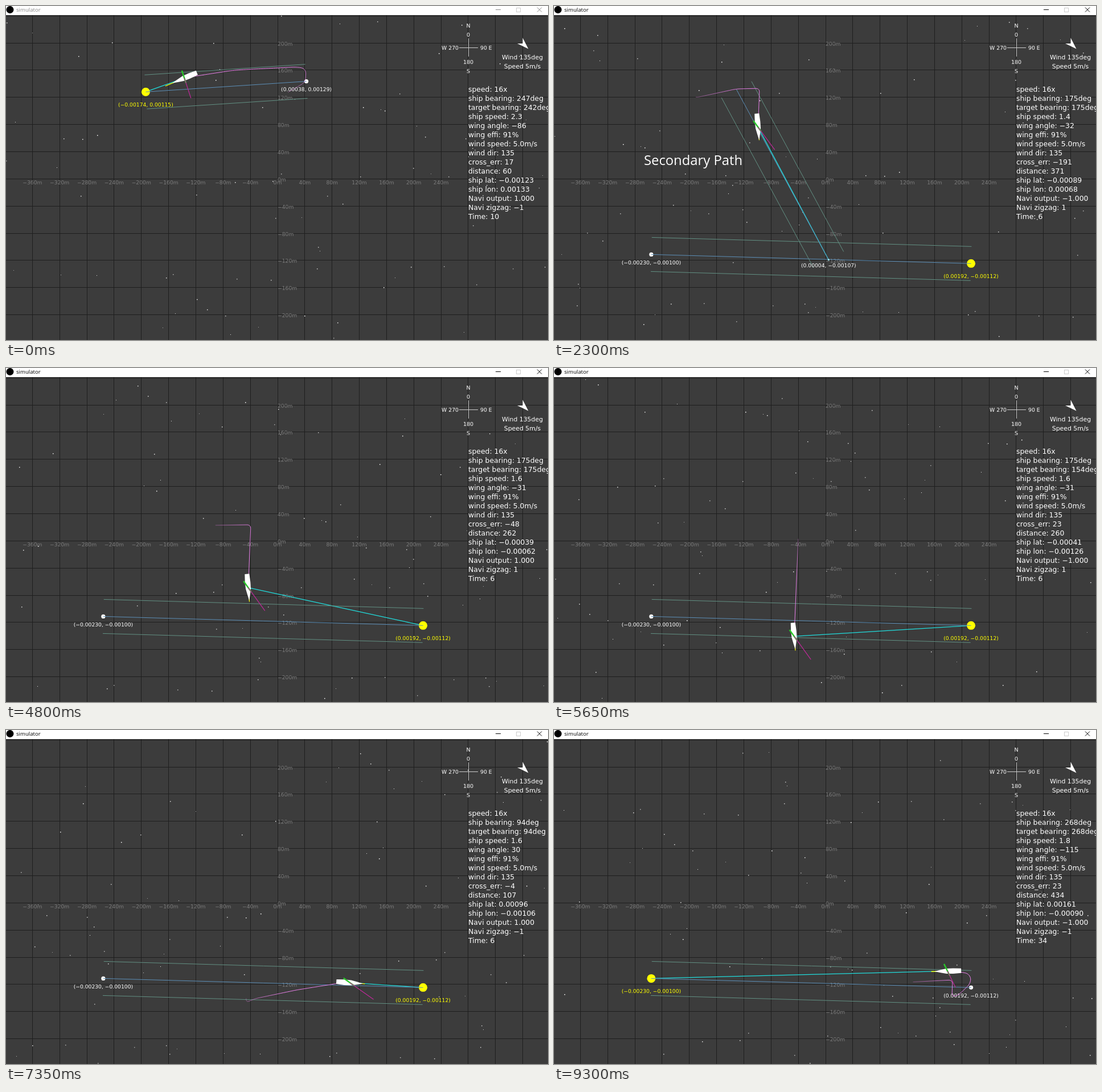
Write an HTML page with a canvas that moves like this. It is 952x588 px and loops after 9.35 s.

```html
<!DOCTYPE html>
<html lang="en">
<head>
<meta charset="utf-8">
<title>simulator</title>
<style>
  html, body { margin: 0; width: 100%; height: 100%; overflow: hidden; background: #3c3c3c; }
  canvas { display: block; }
</style>
</head>
<body>
<canvas id="stage" width="952" height="588"></canvas>
<script>
const ctx = document.getElementById('stage').getContext('2d');
const LOOP = 9350, STEP = 50, TRAIL = 1700, TURN = 70;
const ORIGIN_X = 477, ORIGIN_Y = 304.3, PX_PER_DEG = 133100;
const GRID = 47.85, PX_PER_M = PX_PER_DEG / 111000;
const SANS = '"DejaVu Sans", sans-serif';
const UI = '"Open Sans", sans-serif';

// Where the ship changes course: time, x, y
const turns = [
  [-1750, 490, 155], [-1400, 526, 134], [-1220, 527, 111], [-1130, 515, 107],
  [-600, 400, 113], [15, 311, 126.8], [520, 242, 156], [580, 246, 162],
  [1170, 320, 146], [1565, 361, 145], [2985, 356, 277], [3705, 430, 276],
  [5725, 421.5, 480], [5890, 437, 473], [6500, 510.3, 457.7], [7150, 583, 446],
  [8255, 700, 440], [8560, 699, 470], [8640, 709, 468], [8860, 733, 445],
  [8960, 731, 430], [9040, 721, 427], [9450, 674, 423]
];

const place = (lat, lon) => ({ lat, lon, x: ORIGIN_X + lat * PX_PER_DEG, y: ORIGIN_Y - lon * PX_PER_DEG });
const east = place(0.00038, 0.00129), west = place(-0.00174, 0.00115);
const left = place(-0.0023, -0.001), right = place(0.00192, -0.00112);
const detourStart = { x: 320.5, y: 147 }, detourEnd = place(0.00004, -0.00107);
const legs = [
  { begin: 0, from: east, to: west, timer: 10 },
  { begin: 500, from: west, to: east, timer: 6 },
  { begin: 1150, from: left, to: right, timer: 6 },
  { begin: 8650, from: right, to: left, timer: 34 }
];

const sin = deg => Math.sin(deg * Math.PI / 180);
const bearingVector = deg => [sin(deg), -sin(90 - deg)];
const bearingOf = (x, y) => (Math.atan2(y, x) * 180 / Math.PI + 450) % 360;
const number = (value, digits = 0) => value.toFixed(digits).replace('-', '\u2212');

function routePoint(t) {
  const i = Math.max(1, turns.findIndex(p => p[0] > t));
  const a = turns[i - 1], b = turns[i], u = (t - a[0]) / (b[0] - a[0]);
  return [a[1] + (b[1] - a[1]) * u, a[2] + (b[2] - a[2]) * u];
}

// Averaging the straight route over a short time rounds its corners
function position(t) {
  let x = 0, y = 0;
  for (let k = -4; k <= 4; k++) {
    const p = routePoint(t + k / 4.5 * TURN);
    x += p[0] / 9;
    y += p[1] / 9;
  }
  return [x, y];
}

function shipAt(t) {
  const [x, y] = position(t), before = routePoint(t - TURN), after = routePoint(t + TURN);
  const dx = after[0] - before[0], dy = after[1] - before[1];
  const course = bearingOf(dx, dy);
  const heading = (course + 10 * sin(135 - course) + 360) % 360; // leeway
  const speed = Math.hypot(dx, dy) / (2 * TURN) * 15.5;
  const [hx, hy] = bearingVector(heading), [wx, wy] = bearingVector(135);
  const ax = wx * 5 + hx * speed, ay = wy * 5 + hy * speed;
  const wind = bearingOf(ax, ay);
  const wing = (wind - heading + 540) % 360 - 180;
  return { x, y, heading, speed, wind, wing, windSpeed: Math.hypot(ax, ay) };
}

function line(x1, y1, x2, y2, color, width = 1) {
  ctx.strokeStyle = color;
  ctx.lineWidth = width;
  ctx.beginPath();
  ctx.moveTo(x1, y1);
  ctx.lineTo(x2, y2);
  ctx.stroke();
}

function dot(x, y, r, color) {
  ctx.fillStyle = color;
  ctx.beginPath();
  ctx.arc(x, y, r, 0, 7);
  ctx.fill();
}

function shape(points, fill) {
  ctx.fillStyle = fill;
  ctx.beginPath();
  points.forEach(p => ctx.lineTo(...p));
  ctx.closePath();
  ctx.fill();
}

function text(string, x, y, size, color = '#fff', align = 'left', family = SANS) {
  ctx.font = `${size}px ${family}`;
  ctx.fillStyle = color;
  ctx.textAlign = align;
  ctx.fillText(string, x, y);
}

function drawGrid() {
  for (let k = -9; k <= 9; k++) {
    const x = Math.floor(ORIGIN_X + k * GRID) + 0.5, y = Math.floor(ORIGIN_Y + k * GRID) + 0.5;
    line(x, 16, x, 588, '#1e1e1e');
    line(0, y, 952, y, '#1e1e1e');
  }
  for (let k = -9; k <= 6; k++) {
    const label = number(k * 40) + 'm';
    text(label, ORIGIN_X + k * GRID, 313.5, 9.2, '#7c7c7c', 'center');
    if (Math.abs(k) <= 5) text(label, 477, ORIGIN_Y - k * GRID + 4.5, 9.2, '#7c7c7c');
  }
}

let seed = 11;
const random = () => (seed = seed * 16807 % 2147483647) / 2147483647;
const specks = Array.from({ length: 82 }, () =>
  ({ x: random() * 952, y: random() * 571, size: random() < 0.6 ? 1.5 : 1, light: 0.5 + random() * 0.5 }));

// Wind-borne specks drift to the north-west
function drawSpecks(t) {
  const drift = (v, span) => Math.round(((v - t * 0.22) % span + span) % span);
  for (const s of specks) {
    ctx.fillStyle = `rgba(255,255,255,${s.light})`;
    ctx.fillRect(drift(s.x, 952), 17 + drift(s.y, 571), s.size, s.size);
  }
}

function drawChannel(a, b) {
  const length = Math.hypot(b.x - a.x, b.y - a.y);
  const nx = -(b.y - a.y) / length * 30, ny = (b.x - a.x) / length * 30;
  line(a.x, a.y, b.x, b.y, '#5c8fb8');
  for (const s of [-1, 1]) line(a.x + s * nx, a.y + s * ny, b.x + s * nx, b.y + s * ny, '#629083');
}

function coordinates(p, offset, color) {
  text(`(${number(p.lat, 5)}, ${number(p.lon, 5)})`, p.x, p.y + offset + 3.5, 9.2, color, 'center');
}

function drawTrail(t) {
  let previous = position(t - TRAIL);
  for (let age = TRAIL - 20; age >= 0; age -= 20) {
    const next = position(t - age);
    const alpha = Math.min(1, 0.35 + 1.6 * (1 - age / TRAIL));
    line(...previous, ...next, `rgba(238,130,238,${alpha})`);
    previous = next;
  }
}

function drawShip({ x, y, heading, speed, wind, windSpeed, wing }) {
  const [hx, hy] = bearingVector(heading), [wx, wy] = bearingVector(wind);
  line(x, y, x + hx * speed * 16, y + hy * speed * 16, '#ff0', 1.3);
  ctx.save();
  ctx.translate(x, y);
  ctx.rotate((heading - 90) * Math.PI / 180);
  shape([[-24, -4], [-10, -4.8], [2, -4.5], [12, -2.5], [23, 0], [12, 2.5], [2, 4.5], [-10, 4.8], [-24, 4]], '#fff');
  ctx.restore();
  const wingColor = Math.abs(wing) < 15 ? '#a8288f' : '#28c828';
  line(x - wx * 14, y - wy * 14, x + wx * 9, y + wy * 9, wingColor, 2.4);
  line(x, y, x + wx * windSpeed * 8, y + wy * windSpeed * 8, '#c0289a', 1.2);
}

function drawCompass() {
  line(796, 73.5, 829, 73.5, '#ccc');
  line(812.5, 57, 812.5, 89, '#ccc');
  ['N', '0', '', '', '180', 'S'].forEach((s, i) => text(s, 812, 37.5 + i * 16, 9.5, '#fff', 'center'));
  text('W 270', 795, 77, 9.3, '#fff', 'right');
  text('90 E', 833, 77, 9.3);
  shape([[917.5, 75.5], [907.5, 56], [907.5, 66], [898, 66]], '#fff');
  text('Wind 135deg', 907, 94, 10.9, '#fff', 'center');
  text('Speed 5m/s', 907, 110, 10.9, '#fff', 'center');
}

function drawPanel(t, ship, { from, to, timer }) {
  const dx = to.x - from.x, dy = to.y - from.y;
  const cross = (dx * (ship.y - from.y) - dy * (ship.x - from.x)) / Math.hypot(dx, dy) / PX_PER_M;
  const distance = Math.hypot(to.x - ship.x, to.y - ship.y) / PX_PER_M;
  const target = shipAt(t + 45).heading;
  [
    'speed: 16x',
    `ship bearing: ${number(ship.heading)}deg`,
    `target bearing: ${number(target)}deg`,
    `ship speed: ${number(ship.speed, 1)}`,
    `wing angle: ${number(Math.floor(ship.wing))}`,
    'wing effi: 91%',
    'wind speed: 5.0m/s',
    'wind dir: 135',
    `cross_err: ${number(Math.round(cross))}`,
    `distance: ${number(distance)}`,
    `ship lat: ${number((ship.x - ORIGIN_X) / PX_PER_DEG, 5)}`,
    `ship lon: ${number((ORIGIN_Y - ship.y) / PX_PER_DEG, 5)}`,
    `Navi output: ${number(Math.sign(Math.cos(t * 2 * Math.PI / 4100)), 3)}`,
    `Navi zigzag: ${number(target > 135 && target < 225 ? 1 : -1)}`,
    `Time: ${timer}`
  ].forEach((row, i) => text(row, 812, 151 + i * 16, 12.4));
}

function drawTitleBar(focused) {
  const ink = focused ? '#000' : '#888';
  ctx.fillStyle = '#fff';
  ctx.fillRect(0, 0, 952, 16);
  dot(7, 6.5, 6.5, '#000');
  text('simulator', 18, 10, 9.6, ink, 'left', UI);
  line(860, 6.5, 869, 6.5, ink);
  ctx.strokeStyle = '#ccc';
  ctx.strokeRect(896.5, 3.5, 7, 7);
  line(933, 2.5, 941, 10.5, ink);
  line(941, 2.5, 933, 10.5, ink);
}

function drawCursor(t) {
  const u = Math.min(1, Math.max(0, (t - 750) / 400)), ease = u * u * (3 - 2 * u);
  ctx.save();
  ctx.translate(left.x + (right.x - left.x) * ease - 2, left.y + (right.y - left.y) * ease);
  shape([[0, 0], [0, 19], [4.3, 15], [7.5, 22], [10.5, 20.7], [7.5, 14], [13.5, 14]], '#fff');
  ctx.strokeStyle = '#333';
  ctx.lineWidth = 0.7;
  ctx.stroke();
  ctx.restore();
}

function draw(t) {
  const ship = shipAt(t), leg = legs.findLast(l => l.begin <= t), { from, to } = leg;
  const detour = t >= 1150 && t < 4750, goal = detour ? detourEnd : to;
  ctx.fillStyle = '#3c3c3c';
  ctx.fillRect(0, 0, 952, 588);
  drawGrid();
  drawSpecks(t);
  drawCompass();
  drawPanel(t, ship, leg);
  line(ship.x, ship.y, goal.x, goal.y, '#20dcdc', 1.3);
  dot(from.x, from.y, 3.6, '#fff');
  dot(to.x, to.y, 7.5, '#ff0');
  drawChannel(from, to);
  coordinates(from, 14, '#fff');
  coordinates(to, 22, '#ff0');
  if (detour) {
    drawChannel(detourStart, detourEnd);
    dot(detourEnd.x, detourEnd.y, 1.6, '#9fe8f0');
    coordinates(detourEnd, 10, '#fff');
  }
  drawTrail(t);
  drawShip(ship);
  if (t >= 2000 && t < 4000) text('Secondary Path', 158, 280, 23.8, '#fff', 'left', UI);
  drawTitleBar(t >= 750);
  if (t >= 700 && t < 1500) drawCursor(t);
}

const start = performance.now();
function frame() {
  const t = (performance.now() - start) % LOOP;
  draw(Math.floor(t / STEP) * STEP);
  requestAnimationFrame(frame);
}
frame();
</script>
</body>
</html>
```
